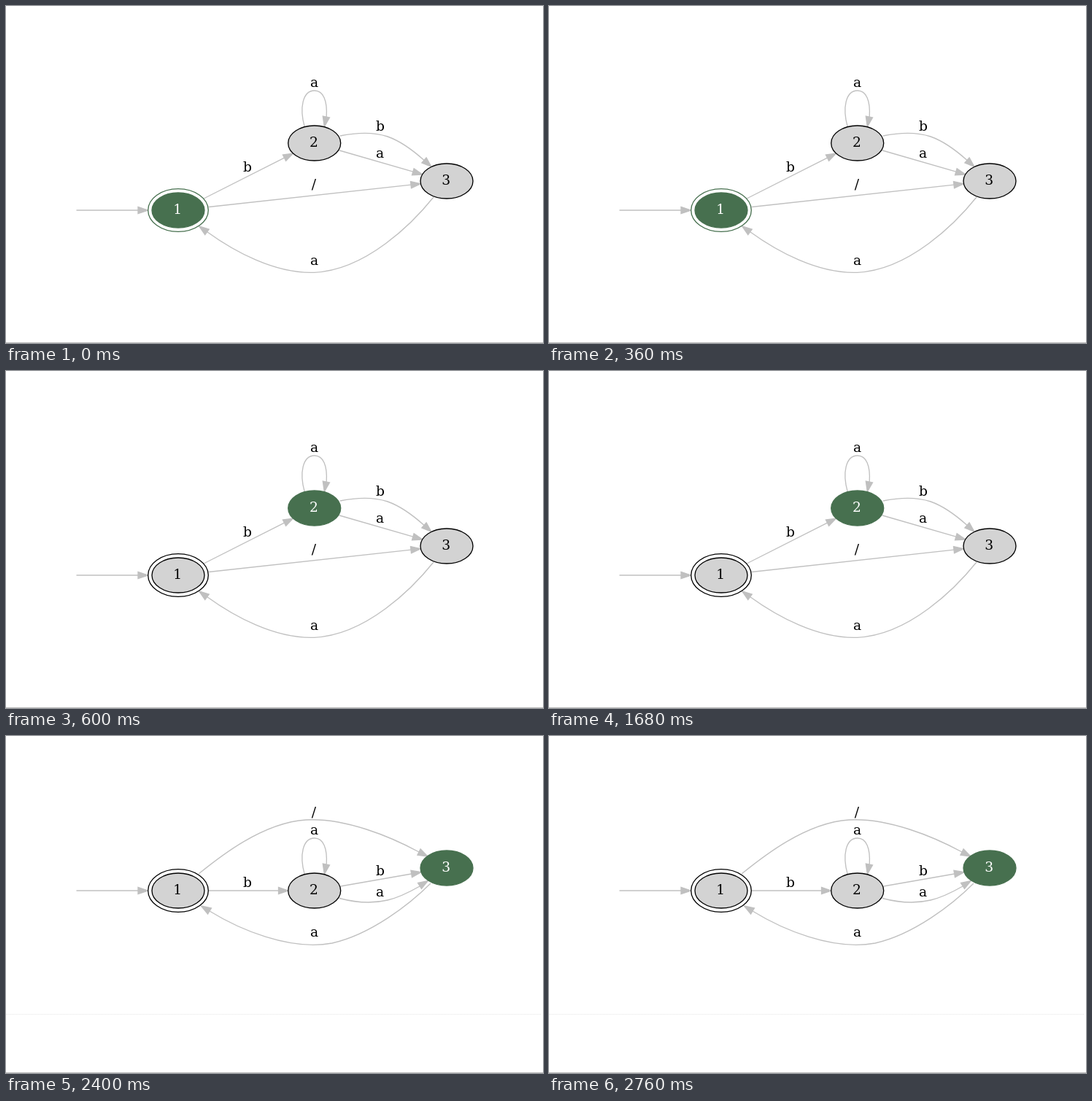
Write an HTML page with a canvas that moves like this. It is 736 px wide and 462 px high and loops after 3 s.

```html
<!DOCTYPE html>
<html lang="en">
<head>
<meta charset="utf-8">
<title>State machine</title>
<style>
html, body { margin: 0; width: 100%; height: 100%; overflow: hidden; background: #fff; }
canvas { display: block; }
</style>
</head>
<body>
<canvas id="stage" width="736" height="462"></canvas>
<script>
const ctx = document.getElementById('stage').getContext('2d');
const LOOP = 3000;
const GREEN = '#47704f', GRAY = '#d3d3d3', EDGE = '#c0c0c0';
const LINE = 4 / 3;
const FONT = '18.67px "DejaVu Serif", "Noto Serif", serif';

// Edge: [path, base x, base y, tip x, tip y]; label: [text, x, baseline]
const selfLoop = cy => [
  `M409.2 ${cy - 22.5}C402 ${cy - 48} 406.5 ${cy - 72} 422.7 ${cy - 72}` +
  `C435 ${cy - 72} 440.6 ${cy - 58} 439.2 ${cy - 36}`,
  438.9, cy - 36, 436.3, cy - 22.5
];

const wide = {
  nodes: [[236, 280], [422.7, 188], [604, 240]],
  edges: [
    ['M96.5 280H181', 181, 280, 194.5, 280],
    ['M271 264L381.5 208.2', 381.5, 208.2, 393.3, 202.2],
    selfLoop(188),
    ['M458 178C478 174 502 172 523 179C540 185 558 198 573 211.5', 573, 211.5, 583, 220.3],
    ['M457 198L557.8 227.2', 557.8, 227.2, 570.8, 231],
    ['M278 275.5L555 245.2', 555, 245.2, 568.4, 243.7],
    ['M586 262C558 297 494 362 422.7 365.3C369 367.5 312 336 275.5 309.5', 275.5, 309.8, 264.7, 302]
  ],
  labels: [['a', 422.5, 111], ['b', 331, 227], ['b', 513, 171],
    ['a', 512.5, 208], ['/', 422, 251], ['a', 422.5, 355]]
};

const flat = {
  nodes: [[236, 212], [422.7, 212], [604, 181]],
  edges: [
    ['M96.5 212H181', 181, 212, 194.5, 212],
    ['M278 212H373.5', 373.5, 212, 386.8, 212],
    selfLoop(212),
    ['M458.5 206L555.7 189', 555.7, 189, 569, 186.7],
    ['M457 222.5C478 228 502 230 523 225C538 221.5 553 214 567 206', 567, 205.5, 578.3, 198.5],
    ['M264 189C290 168 350 119 411 115C465 112 527 138 566 159', 566, 159, 578, 165],
    ['M582 202C553 231 500 272 447 284C388 295 318 264 279 240', 279, 240, 267.5, 233]
  ],
  labels: [['/', 422, 111], ['a', 422.5, 135], ['b', 331, 207],
    ['b', 513, 191], ['a', 512.5, 220], ['a', 422.5, 275]],
  divider: true
};

function text(str, x, y, color) {
  ctx.fillStyle = color;
  ctx.fillText(str, x, y);
}

function edge([path, bx, by, tx, ty]) {
  ctx.strokeStyle = ctx.fillStyle = EDGE;
  ctx.stroke(new Path2D(path));
  const len = Math.hypot(tx - bx, ty - by);
  const nx = (by - ty) / len * 4.67, ny = (tx - bx) / len * 4.67;
  ctx.beginPath();
  ctx.moveTo(tx, ty);
  ctx.lineTo(bx + nx, by + ny);
  ctx.lineTo(bx - nx, by - ny);
  ctx.closePath();
  ctx.fill();
  ctx.stroke();
}

function oval(x, y, rx, ry, fill) {
  ctx.beginPath();
  ctx.ellipse(x, y, rx, ry, 0, 0, Math.PI * 2);
  ctx.fillStyle = fill;
  ctx.fill();
  ctx.stroke();
}

function node([x, y], i, active) {
  const on = i === active;
  ctx.strokeStyle = on ? GREEN : '#000';
  if (i === 0) oval(x, y, 41.3, 29.3, '#fff');
  oval(x, y, 36, 24, on ? GREEN : GRAY);
  text(i + 1, x - 0.8, y + 5, on ? '#fff' : '#000');
}

function draw(graph, active) {
  ctx.fillStyle = '#fff';
  ctx.fillRect(0, 0, 736, 462);
  ctx.lineWidth = LINE;
  ctx.font = FONT;
  ctx.textAlign = 'center';
  graph.edges.forEach(edge);
  graph.nodes.forEach((n, i) => node(n, i, active));
  graph.labels.forEach(([str, x, y]) => text(str, x, y, '#000'));
  if (graph.divider) {
    ctx.fillStyle = '#e6e6e6';
    for (let x = 0; x < 734; x += 2) ctx.fillRect(x, 381, 1, 1);
  }
  ctx.fillStyle = '#bdbdbd';
  ctx.fillRect(0, 461, 736, 1);
}

function tick() {
  const t = performance.now() % LOOP;
  if (t < 600) draw(wide, 0);
  else if (t < 2400) draw(wide, 1);
  else draw(flat, 2);
  requestAnimationFrame(tick);
}
tick();
</script>
</body>
</html>
```
